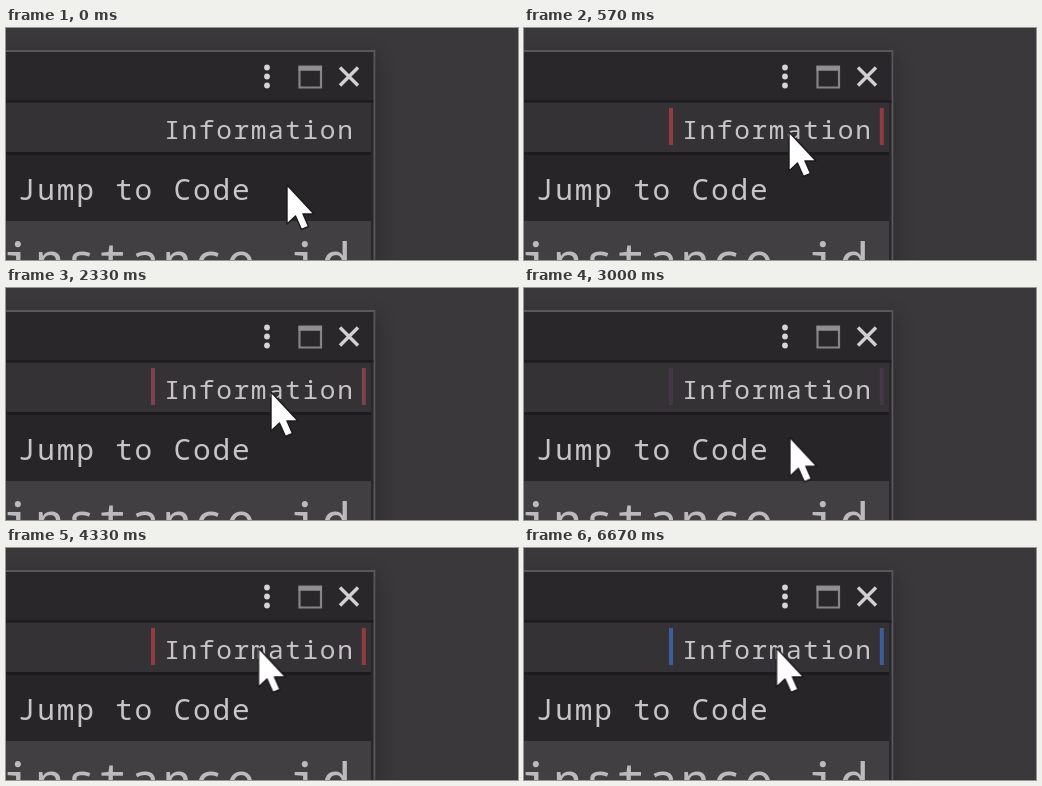
These frames come from a looping animation (512 px wide and 232 px high, 6.76 s). An HTML page:

```html
<!DOCTYPE html>
<html lang="en">
<head>
<meta charset="utf-8">
<title>Hover bars</title>
<style>
  html, body { margin: 0; width: 100%; height: 100%; overflow: hidden; background: #3a383b; }
  svg { display: block; width: 512px; height: 232px; }
  text { font-family: "Noto Sans Mono", "DejaVu Sans Mono", monospace; letter-spacing: .06em; white-space: pre; }
  .soft { filter: blur(.5px); }
  .shadow { filter: blur(10px); }
</style>
</head>
<body>
<svg viewBox="0 0 512 232">
  <rect width="512" height="232" fill="#3a383b"/>
  <rect class="shadow" x="-40" y="28" width="411" height="260" fill="#000" opacity=".24"/>

  <!-- window -->
  <rect y="22" width="369.3" height="210" fill="#59575a"/>
  <rect y="24" width="367.5" height="208" fill="#29272a"/>
  <rect y="72" width="367.5" height="2.5" fill="#1f1d20"/>
  <rect y="75" width="365" height="49" fill="#343235"/>
  <rect y="124" width="365" height="3" fill="#1d1b1e"/>
  <rect y="127" width="365" height="66" fill="#272528"/>
  <rect y="193" width="365" height="39" fill="#413f42"/>

  <!-- title buttons -->
  <g class="soft">
    <g fill="#d6d4d6">
      <circle cx="261" cy="39.5" r="2.9"/>
      <circle cx="261" cy="48.5" r="2.9"/>
      <circle cx="261" cy="57.5" r="2.9"/>
    </g>
    <path d="M293.5 38.5h21.5v21h-21.5z" fill="none" stroke="#858385" stroke-width="2.2"/>
    <path d="M292.5 40.5h23.5" stroke="#918f91" stroke-width="4.5"/>
    <path d="M334 39.5l18 18m0-18l-18 18" stroke="#d2d0d3" stroke-width="3.4"/>
  </g>

  <g class="soft" fill="#c6c4c6">
    <text x="158.3" y="111" font-size="26.2">Information</text>
    <text x="11.8" y="172" font-size="29.5">Jump to Code</text>
    <text x="-3" y="250.5" font-size="48.3" fill="#bcbabc">instance id</text>
  </g>

  <g id="bars">
    <rect x="145" y="80" width="4" height="37"/>
    <rect x="355.8" y="80" width="4" height="37"/>
  </g>

  <path id="cursor" d="M0 0V39L8.5 31L14.5 44.5L21.5 41.5L16 29H27Z"
        fill="#fff" stroke="#1c1a1d" stroke-width="1.4" stroke-linejoin="round"/>
</svg>
<script>
const LOOP = 6760;
const RED = '#903c40', BLUE = '#3d5c9c', MIX = '#684a6c', ROSE = '#7e424f';

function track(id, steps, toStyle) {
  const frames = steps.map(([ms, ...values]) => ({ offset: ms / LOOP, ...toStyle(...values) }));
  document.getElementById(id).animate(frames, { duration: LOOP, iterations: Infinity });
}

track('cursor', [
  [0, 281, 157], [30, 281, 157], [30, 278, 155], [200, 278, 155],
  [300, 271, 131], [430, 265, 104], [2830, 265, 104],
  [3030, 266, 157], [3270, 266, 157], [3330, 265, 151], [4200, 265, 151],
  [4320, 252.5, 100], [LOOP, 252.5, 100]
], (x, y) => ({ transform: `translate(${x}px, ${y}px)` }));

track('bars', [
  [0, RED, 0], [310, RED, 0], [430, RED, 1],
  [600, RED, 1], [830, BLUE, 1], [1220, BLUE, 1], [1400, RED, 1],
  [1690, RED, 1], [1930, BLUE, 1], [2240, BLUE, 1], [2330, ROSE, 1],
  [2790, ROSE, 1], [2900, MIX, 1], [3030, MIX, .1], [3270, MIX, .1], [3330, MIX, 0],
  [4230, RED, 0], [4320, RED, 1],
  [4370, RED, 1], [4600, BLUE, 1], [5060, BLUE, 1], [5230, RED, 1],
  [5540, RED, 1], [5570, MIX, 1], [5600, MIX, 1], [5630, BLUE, 1],
  [5990, BLUE, 1], [6170, RED, 1], [6590, RED, 1], [6670, BLUE, 1], [LOOP, BLUE, 1]
], (fill, opacity) => ({ fill, opacity }));
</script>
</body>
</html>
```
